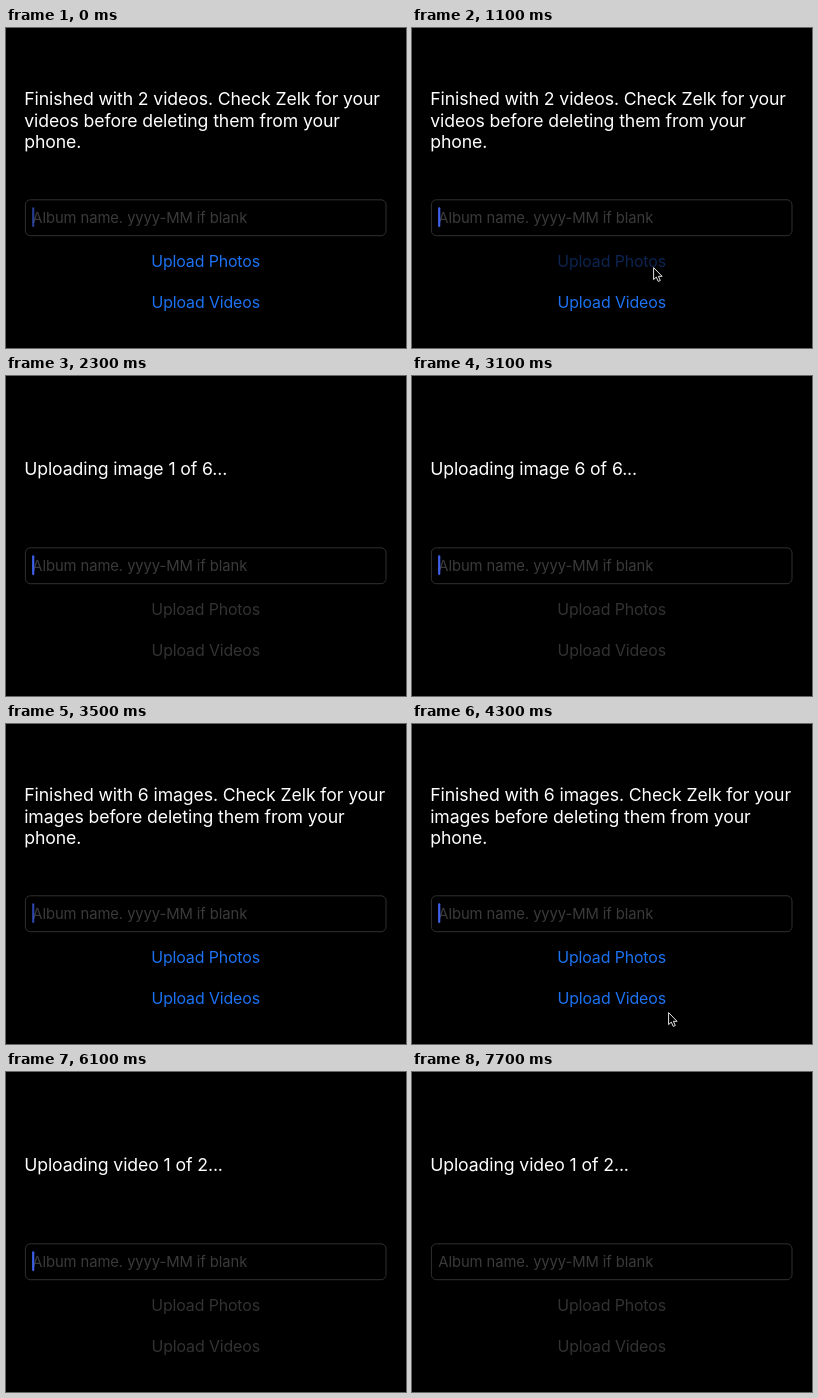
An HTML page for the animation above (8 s loop, 400 by 320 pixels).

```html
<!DOCTYPE html>
<html lang="en">
<head>
<meta charset="utf-8">
<title>Upload screen</title>
<style>
  html, body { margin: 0; width: 100%; height: 100%; overflow: hidden; background: #000; }
  svg { display: block; width: 400px; height: 320px; }
  text { font-family: Inter, "Open Sans", sans-serif; white-space: pre; }
  .message { font-size: 17.65px; letter-spacing: -0.1px; fill: #fff; }
  .hint { font-size: 14.8px; letter-spacing: -0.08px; fill: #3a3a3c; }
  .button { font-size: 15.9px; letter-spacing: -0.11px; text-anchor: middle; }
</style>
</head>
<body>
<svg viewBox="0 0 400 320">
  <rect width="400" height="320" fill="#000"/>
  <g class="message">
    <text x="18.2" y="77.2"></text>
    <text x="18.2" y="98.8"></text>
    <text x="18.2" y="120.3"></text>
  </g>
  <rect x="19.4" y="171.8" width="360.6" height="35.9" rx="5" fill="none" stroke="#303032"/>
  <text class="hint" x="26.3" y="194.6">Album name. yyyy-MM if blank</text>
  <rect id="caret" x="26.1" y="179.2" width="2.2" height="19.8" rx="1" fill="#3d60ea"/>
  <text class="button" id="photos" x="199.6" y="238.7">Upload Photos</text>
  <text class="button" id="videos" x="199.7" y="279.7">Upload Videos</text>
  <path id="cursor" d="M.6 .6V12.6L3.3 10.1L5.2 14.4L7.3 13.5L5.4 9.3H9.1Z"
        fill="#000" stroke="#e4e4e4" stroke-linejoin="round"/>
</svg>
<script>
const LOOP = 8000, TICK = 100;
const BLUE = '#1c72f2', BLUE_DOWN = '#0d2450', GRAY = '#323234', GRAY_DOWN = '#161617';
const BLINK = [0.6, 1, 1, 1, 1, 0.7, 0.3, 0, 0, 0];

// Mouse visits: [tick, x, y]
const VISITS = [
  [[2, 272, 299], [4, 267, 281], [6, 255, 258], [9, 241, 239], [14, 241, 239]],
  [[41, 390, 274], [42, 306, 286], [43, 256, 288], [45, 248.5, 275], [49, 248.5, 275], [50, 324, 280]]
];
// Ticks at which the image counter reaches 2, 3, 4, 5, 6
const COUNTS = [24, 26, 27, 29, 31];

const lines = document.querySelectorAll('.message text');
const byId = id => document.getElementById(id);
const caret = byId('caret'), photos = byId('photos'), videos = byId('videos'), cursor = byId('cursor');
const within = (n, from, to) => n >= from && n < to;

function mouseAt(n) {
  const path = VISITS.find(v => n >= v[0][0] && n <= v[v.length - 1][0]);
  if (!path) return null;
  const i = Math.max(1, path.findIndex(p => p[0] >= n));
  const [t0, x0, y0] = path[i - 1], [t1, x1, y1] = path[i];
  const k = (n - t0) / (t1 - t0);
  return [x0 + (x1 - x0) * k, y0 + (y1 - y0) * k];
}

const finished = (count, kind) => [
  `Finished with ${count} ${kind}. Check Zelk for your`,
  `${kind} before deleting them from your`,
  'phone.'
];
const uploading = (kind, i, total) => ['', `Uploading ${kind} ${i} of ${total}...`, ''];

function messageAt(n) {
  if (n < 12) return finished(2, 'videos');
  if (n < 32) return uploading('image', 1 + COUNTS.filter(c => n >= c).length, 6);
  if (n < 47) return finished(6, 'images');
  return uploading('video', 1, 2);
}

function buttonColor(busy, down) {
  if (busy) return down ? GRAY_DOWN : GRAY;
  return down ? BLUE_DOWN : BLUE;
}

function draw(now) {
  const n = Math.floor((now % LOOP) / TICK);
  const busy = within(n, 12, 32) || n >= 47;
  messageAt(n).forEach((s, i) => {
    if (lines[i].textContent !== s) lines[i].textContent = s;
  });
  photos.setAttribute('fill', buttonColor(busy, within(n, 10, 14)));
  videos.setAttribute('fill', buttonColor(busy, within(n, 46, 48)));
  caret.setAttribute('opacity', BLINK[n % 10]);
  const mouse = mouseAt(n);
  cursor.setAttribute('visibility', mouse ? 'visible' : 'hidden');
  if (mouse) cursor.setAttribute('transform', `translate(${mouse})`);
}

let start = null;
function frame(now) {
  if (start === null) start = now;
  draw(now - start);
  requestAnimationFrame(frame);
}
draw(0);
requestAnimationFrame(frame);
</script>
</body>
</html>
```
